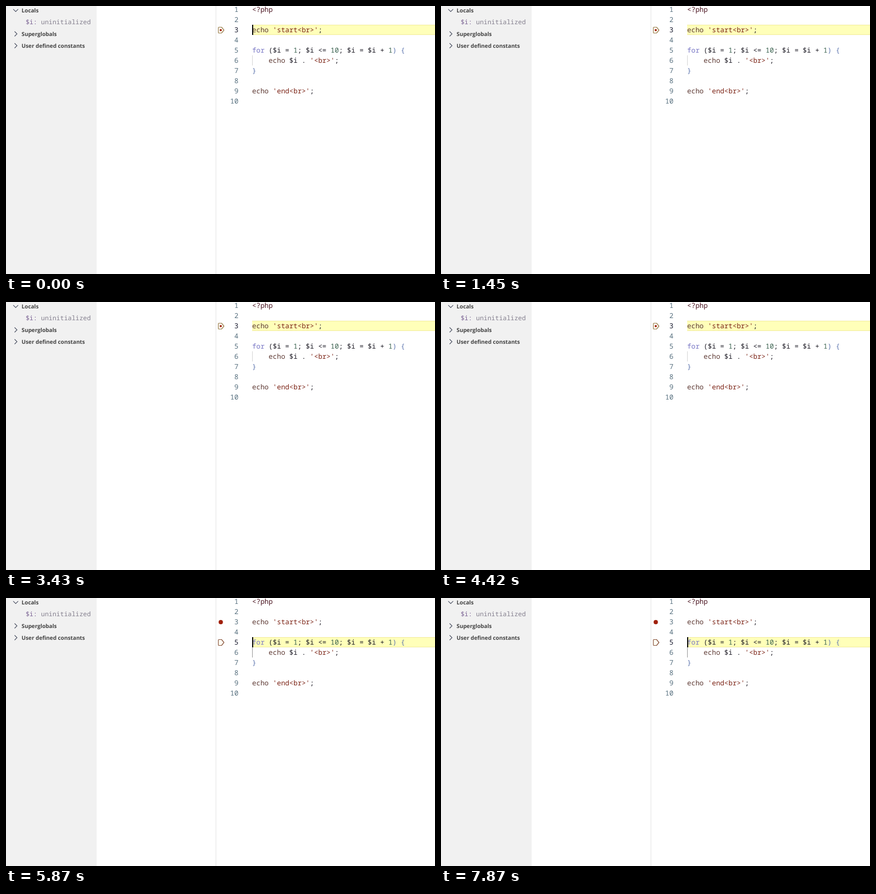
Animation, 800 px wide and 500 px high, one loop 8 s. Source, as an HTML page:

```html
<!DOCTYPE html>
<html lang="en">
<head>
<meta charset="utf-8">
<style>
  html, body { margin: 0; width: 100%; height: 100%; overflow: hidden; background: #fff; }
  svg { display: block; width: 800px; height: 500px; }
  text { white-space: pre; text-rendering: geometricPrecision; }
  .code text { font: 12.83px "Noto Sans Mono", "DejaVu Sans Mono", monospace; fill: #1c1a24; }
  .code .num { fill: #566f7e; text-anchor: end; }
  .code .num.on { fill: #16182c; }
  .tag { fill: #4a1420; }
  .fn { fill: #5e3a34; }
  .str { fill: #7c2416; }
  .key { fill: #7674c4; }
  .lit { fill: #3b6350; }
  .brace { fill: #5c74ae; }
  .head { font: bold 10.25px "Open Sans", "Noto Sans", sans-serif; fill: #444; }
  .var { font: 11.92px "Noto Sans Mono", "DejaVu Sans Mono", monospace; fill: #85808f; }
  .name { fill: #7c6494; }
  .chev { fill: none; stroke: #4a5062; stroke-width: 1.1; }
  .arrow { fill: #fffdf4; stroke-width: 1.2; stroke-linejoin: round; }
</style>
</head>
<body>
<svg viewBox="0 0 800 500">
  <rect width="169" height="500" fill="#f1f1f1"/>
  <rect x="391" width="1" height="500" fill="#e3e3e3"/>

  <path class="chev" d="M13.5 5.8l4.6 4.7 4.6-4.7M16 47.5l4.6 4.5-4.6 4.5M16 69.5l4.6 4.5-4.6 4.5"/>
  <text class="head" x="29" y="12">Locals</text>
  <text class="var" x="36.7" y="34"><tspan class="name">$i:</tspan> uninitialized</text>
  <text class="head" x="29" y="56">Superglobals</text>
  <text class="head" x="29" y="78">User defined constants</text>

  <g id="band">
    <rect x="459" y="0" width="341" height="19" fill="#f1eb9c"/>
    <rect x="459" y="1" width="341" height="17" fill="#ffffb9"/>
  </g>
  <rect id="guide" x="459" y="92" width="1" height="19"/>
  <g class="code" id="code"></g>
  <path id="arrow" class="arrow" d="M397 4.5h5l4.5 5.5-4.5 5.5h-5q-1 0-1-1v-9q0-1 1-1z"/>
  <circle id="dot" cx="400.5" cy="45" fill="#a0200c"/>
  <rect id="caret" x="459" y="0" width="2" height="19" fill="#000"/>
</svg>
<script>
const LOOP = 8000, STEP = 4880, ROW = 19, TOP = -3;
const TOGGLES = [460, 920, 1450, 1910, 2440, 2900, 3430, 3890, 4420,
                 4880, 5340, 5870, 6330, 6810, 7340, 7870];

// Each token is [text, class].
const LINES = [
  [['<?php', 'tag']],
  [],
  [['echo', 'fn'], [' '], ["'start<br>'", 'str'], [';']],
  [],
  [['for', 'key'], [' ($i = '], ['1', 'lit'], ['; $i <= '], ['10', 'lit'],
   ['; $i = $i + '], ['1', 'lit'], [')', 'brace'], [' '], ['{', 'brace']],
  [['    '], ['echo', 'fn'], [' $i . '], ["'<br>'", 'str'], [';']],
  [['}', 'brace']],
  [],
  [['echo', 'fn'], [' '], ["'end<br>'", 'str'], [';']],
  []
];

const $ = id => document.getElementById(id);
const rowY = line => TOP + (line - 1) * ROW;

function add(parent, tag, attrs, text = '') {
  const el = document.createElementNS('http://www.w3.org/2000/svg', tag);
  for (const k in attrs) el.setAttribute(k, attrs[k]);
  el.textContent = text;
  return parent.appendChild(el);
}

const nums = LINES.map((tokens, i) => {
  const y = rowY(i + 1) + 14;
  const line = add($('code'), 'text', { x: 459, y });
  for (const [text, cls = ''] of tokens) add(line, 'tspan', { class: cls }, text);
  return add($('code'), 'text', { x: 433.4, y, class: 'num' }, i + 1);
});

function draw(t) {
  const stepped = t >= STEP;
  const line = stepped ? 5 : 3;
  const y = rowY(line);
  for (const id of ['band', 'arrow', 'caret'])
    $(id).setAttribute('transform', `translate(0 ${y})`);
  nums.forEach((n, i) => n.classList.toggle('on', i + 1 === line));
  $('guide').setAttribute('fill', stepped ? '#969696' : '#d3d3d3');
  $('arrow').setAttribute('stroke', stepped ? '#865036' : '#957a48');
  $('dot').setAttribute('r', stepped ? 4 : 2);
  const flips = TOGGLES.filter(at => at <= t).length;
  $('caret').setAttribute('visibility', flips % 2 ? 'hidden' : 'visible');
}

const start = performance.now();
function tick() {
  draw((performance.now() - start) % LOOP);
  requestAnimationFrame(tick);
}
tick();
</script>
</body>
</html>
```
